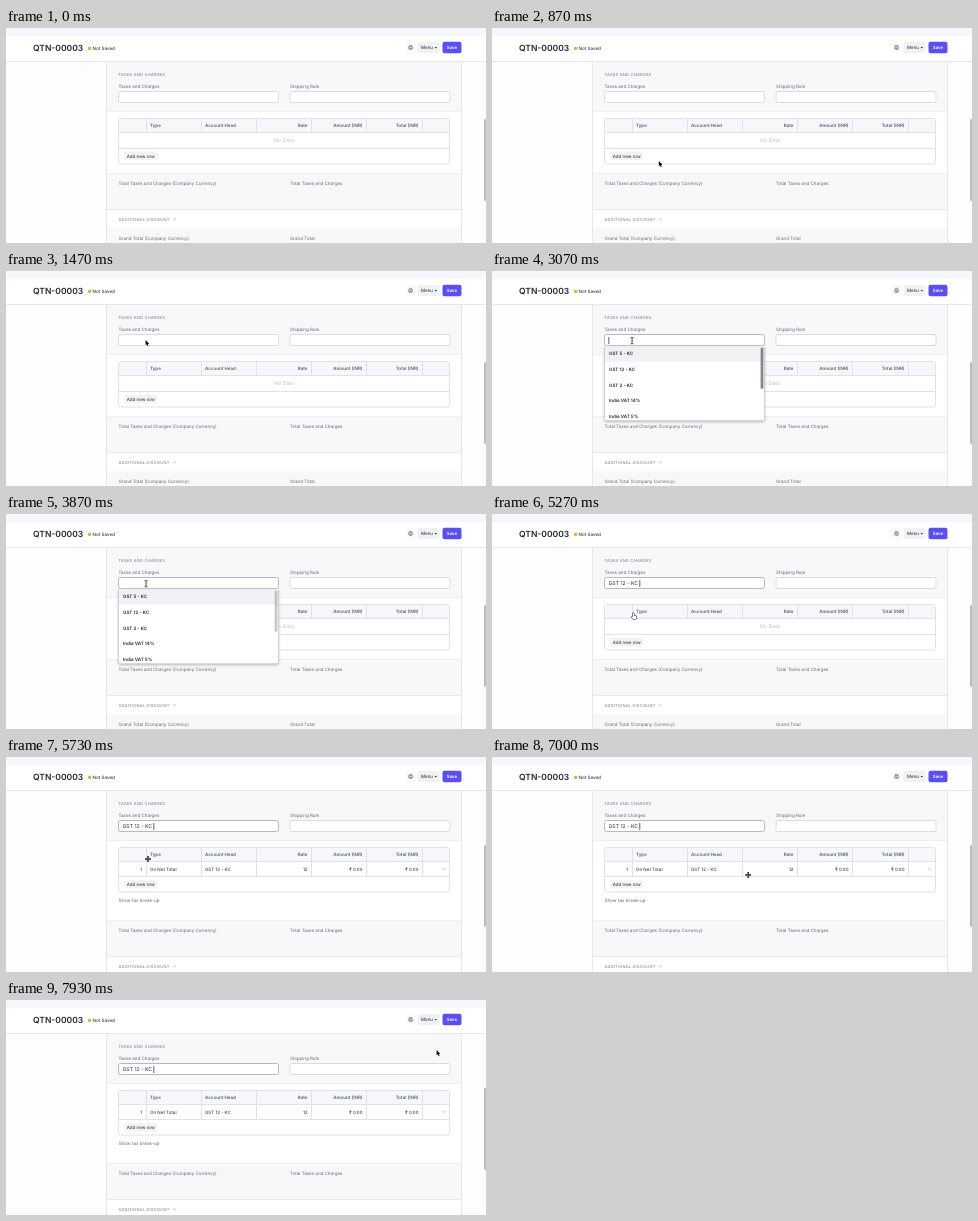
Write an HTML page with a canvas that moves like this. It is 480 px wide and 215 px high and loops after 8000 ms.

```html
<!DOCTYPE html>
<html lang="en">
<head>
<meta charset="utf-8">
<title>Quotation taxes</title>
<style>
html, body { margin: 0; width: 100%; height: 100%; overflow: hidden; background: #fdfcfe; }
canvas { display: block; }
</style>
</head>
<body>
<canvas id="stage" width="480" height="215"></canvas>
<script>
const ctx = document.getElementById('stage').getContext('2d');
const LOOP = 8000;
const OPEN = 3070, CLOSE = 5200, FILLED = 5730;
const INK = '#1f272e', LABEL = '#626a75', LINE = '#dfe2e8', TINT = '#f8f7fa';
const COLUMNS = [140, 195, 250, 305, 360, 416];
const OPTIONS = ['GST 5 - KC', 'GST 12 - KC', 'GST 2 - KC', 'India VAT 14%', 'India VAT 5%'];

const between = (t, a, b) => t >= a && t < b;
const clamp = v => Math.max(0, Math.min(1, v));

function rect(x, y, w, h, color) {
  ctx.fillStyle = color;
  ctx.fillRect(x, y, w, h);
}

function box(x, y, w, h, r, fill, stroke) {
  ctx.beginPath();
  ctx.roundRect(x, y, w, h, r);
  if (fill) { ctx.fillStyle = fill; ctx.fill(); }
  if (stroke) { ctx.strokeStyle = stroke; ctx.lineWidth = 1; ctx.stroke(); }
}

// y is the middle of the capital letters
function text(str, x, y, { size = 4.5, weight = 400, color = LABEL, align = 'left', spacing = 0 } = {}) {
  ctx.font = `${weight} ${size}px Inter, sans-serif`;
  ctx.letterSpacing = spacing + 'px';
  ctx.textAlign = align;
  ctx.fillStyle = color;
  ctx.fillText(str, x, y + size * 0.36);
}

function path(points, x, y, close) {
  ctx.beginPath();
  for (const [px, py] of points) ctx.lineTo(x + px, y + py);
  if (close) ctx.closePath();
}

function chevron(x, y, color) {
  path([[-1.4, -0.6], [0, 0.7], [1.4, -0.6]], x, y);
  ctx.strokeStyle = color;
  ctx.lineWidth = 0.6;
  ctx.stroke();
}

function heading(str, y) {
  text(str, 112.5, y, { size: 4, spacing: 0.24, color: '#6f7782' });
}

function header() {
  rect(0, 0, 480, 34, '#fff');
  rect(0, 0, 480, 8, '#f5f7fc');
  rect(0, 33, 480, 1, '#e5e7ed');
  text('QTN-00003', 27, 20.3, { size: 8.5, weight: 600, color: INK });
  box(82, 18.8, 3.2, 3.2, 1, '#e9ad3d');
  text('Not Saved', 86.5, 20.5, { size: 4.55, weight: 500, color: '#333b44' });

  box(400, 14, 9.5, 11, 2, '#fafafb');
  ctx.strokeStyle = '#69717c';
  ctx.lineWidth = 0.6;
  ctx.strokeRect(402.6, 18.8, 4, 2);
  ctx.strokeRect(403.4, 17.3, 2.4, 1.5);
  rect(403.4, 20.2, 2.4, 1.6, '#8a919a');

  box(411.5, 14, 22, 11, 2, '#f0f1f4');
  text('Menu', 415, 19.7, { color: INK });
  path([[-1.2, -0.6], [1.2, -0.6], [0, 0.8]], 429.8, 19.7, true);
  ctx.fillStyle = INK;
  ctx.fill();
  box(436.5, 13.7, 19, 11.5, 2, '#5b50ee');
  text('Save', 446, 19.6, { size: 4.4, weight: 600, color: '#fff', align: 'center' });
}

function table(filled) {
  const bottom = filled ? 135 : 136;
  const rowEnd = filled ? 119 : 120;
  box(112.5, 90.5, 331, bottom - 90.5, 2, '#fff', LINE);
  rect(113, 91, 330, 14, '#f5f7fa');
  rect(113, 104, 330, 1, LINE);
  rect(113, rowEnd, 330, 1, LINE);
  for (const x of COLUMNS) rect(x, 91, 1, (filled ? rowEnd : 104) - 91, LINE);

  const row = (y, cells, style) => cells.forEach((cell, i) => {
    const numeric = i > 1;
    text(cell, numeric ? COLUMNS[i + 1] - 3.5 : COLUMNS[i] + 4, y,
      { ...style, align: numeric ? 'right' : 'left' });
  });
  row(97.4, ['Type', 'Account Head', 'Rate', 'Amount (INR)', 'Total (INR)'],
    { weight: 600, color: '#59626d' });

  if (filled) {
    text('1', 136, 112, { color: INK, align: 'right' });
    row(112, ['On Net Total', 'GST 12 - KC', '12', '₹ 0.00', '₹ 0.00'], { color: INK });
    chevron(437.5, 112, '#8a929c');
  } else {
    text('No Data', 278, 112.5, { size: 5.2, color: '#bdc3ca', align: 'center' });
  }
  const y = filled ? 127.4 : 128;
  box(118, y - 4.2, 33, 8.4, 1.5, '#f2f3f5');
  text('Add new row', 120.7, y, { color: INK });
}

function form(t) {
  const filled = t >= FILLED;
  const shift = filled ? 18 : 0;
  rect(0, 0, 480, 215, '#fdfcfe');
  rect(101, 34, 354, 181, '#fff');
  rect(101, 34, 354, 49, TINT);
  rect(101, 83, 354, 1, '#eeeff3');
  rect(101, 146 + shift, 354, 35, TINT);
  rect(101, 145 + shift, 354, 1, '#eeeff3');
  rect(101, 181 + shift, 354, 1, '#e7e8ed');
  if (!filled) rect(101, 200, 354, 15, TINT);
  rect(100, 34, 1, 181, '#e5e7ec');
  rect(455, 34, 1, 181, '#e5e7ec');

  heading('TAXES AND CHARGES', 46.6);
  text('Taxes and Charges', 112.5, 58.3);
  text('Shipping Rule', 284, 58.3);
  const focused = t >= 2600;
  box(112.5, 63.5, 160, 11, 2, '#fff', focused ? '#b3b8c2' : '#d9dce3');
  box(284, 63.5, 160, 11, 2, '#fff', '#d9dce3');

  table(filled);
  if (filled) text('Show tax break-up', 112.5, 143.3, { size: 4.6 });
  text('Total Taxes and Charges (Company Currency)', 112.5, 155.7 + shift);
  text('Total Taxes and Charges', 284, 155.7 + shift);
  heading('ADDITIONAL DISCOUNT', 191.2 + shift);
  chevron(168.5, 191.2 + shift, '#8a929c');
  text('Grand Total (Company Currency)', 112.5, 210.5 + shift);
  text('Grand Total', 284, 210.5 + shift);
  box(478, filled ? 88 : 91, 2, 82, 1, '#bcbcc0');
}

function field(t) {
  if (t >= CLOSE) text('GST 12 - KC', 116.5, 69.2, { size: 5.2, color: INK });
  const caretOn = between(t, 2600, 3600) || between(t, 4070, 4450) || t >= 5000;
  if (caretOn) rect(t >= CLOSE ? 147.5 : 116.5, 66, 0.7, 7, '#222');
}

function dropdown(t) {
  if (!between(t, OPEN, CLOSE)) return;
  ctx.save();
  ctx.shadowColor = 'rgba(0,0,0,0.3)';
  ctx.shadowBlur = 3;
  ctx.shadowOffsetY = 1;
  box(112.5, 75, 160, 74.7, 2, '#fff');
  ctx.restore();
  box(112.5, 75, 160, 74.7, 2, null, '#cfd3d9');

  ctx.save();
  ctx.beginPath();
  ctx.rect(113, 75, 159, 74.3);
  ctx.clip();
  const active = t < 4600 ? 0 : 1;
  rect(113, 75.3 + active * 15.7, 159, 15.3, '#eff1f4');
  OPTIONS.forEach((name, i) =>
    text(name, 117, 82.6 + i * 15.7, { size: 4.55, weight: 600, color: INK }));
  ctx.globalAlpha = 1 - clamp((t - 3600) / 500);
  box(268.6, 76.5, 2.8, 41.5, 1.4, '#85878a');
  ctx.restore();
}

// Each move: start, end, from, to, easing
const easeOut = p => 1 - (1 - p) ** 2.2;
const easeIn = p => p ** 1.25;
const linear = p => p;
const MOVES = [
  [600, 1430, [205, 222], [140, 69.5], easeOut],
  [4370, 4640, [140, 69.5], [142, 102], p => clamp(p * 2.1) * 0.8 + clamp(p * 2 - 1) * 0.2],
  [6170, 7000, [142, 102], [256, 118], easeIn],
  [7000, 7930, [256, 118], [431, 50.5], linear]
];

function pointer(t) {
  let [x, y] = MOVES[0][2];
  for (const [start, end, from, to, ease] of MOVES) {
    if (t < start) break;
    const p = ease(clamp((t - start) / (end - start)));
    x = from[0] + (to[0] - from[0]) * p;
    y = from[1] + (to[1] - from[1]) * p;
  }
  return [x, y];
}

function outlined(fill, edge) {
  ctx.lineJoin = 'round';
  ctx.lineWidth = 1;
  ctx.strokeStyle = edge;
  ctx.stroke();
  ctx.fillStyle = fill;
  ctx.fill();
}

const CURSORS = {
  arrow(x, y) {
    path([[0, -0.5], [0, 4.8], [1.2, 3.8], [2.1, 5.8], [3, 5.4], [2.1, 3.5], [3.7, 3.4]], x - 0.4, y, true);
    outlined('#000', '#fff');
  },
  beam(x, y) {
    rect(x - 0.4, y - 3, 0.9, 6.4, '#333');
    rect(x - 1.6, y - 3.2, 3.3, 0.8, '#555');
    rect(x - 1.6, y + 2.9, 3.3, 0.8, '#555');
  },
  hand(x, y) {
    path([[-1.2, -3], [-0.2, -3], [0, -0.6], [2.4, 0], [2.3, 2], [1.7, 3.2], [-1, 3.2],
      [-2.5, 1], [-2.1, 0.3], [-1.2, 1]], x, y, true);
    outlined('#fff', '#111');
  },
  move(x, y) {
    path([[-2.8, 0], [2.8, 0]], x, y);
    ctx.moveTo(x, y - 2.8);
    ctx.lineTo(x, y + 2.8);
    ctx.strokeStyle = '#fff';
    ctx.lineWidth = 2;
    ctx.stroke();
    ctx.strokeStyle = '#111';
    ctx.lineWidth = 1;
    ctx.stroke();
    for (const [dx, dy] of [[1, 0], [-1, 0], [0, 1], [0, -1]]) {
      path([[dx * 3, dy * 3], [dx * 1.7 + dy * 1.3, dy * 1.7 + dx * 1.3],
        [dx * 1.7 - dy * 1.3, dy * 1.7 - dx * 1.3]], x, y, true);
      ctx.fillStyle = '#111';
      ctx.fill();
    }
  }
};

function cursor(t) {
  const [x, y] = pointer(t);
  let kind = 'arrow';
  if (between(t, 2470, CLOSE + 270)) kind = y < 76 ? 'beam' : 'hand';
  else if (t >= CLOSE + 270 && y > 90) kind = 'move';
  CURSORS[kind](x, y);
}

function draw(t) {
  ctx.textRendering = 'geometricPrecision';
  form(t);
  header();
  field(t);
  dropdown(t);
  cursor(t);
}

const began = performance.now();
function frame() {
  draw((performance.now() - began) % LOOP);
  requestAnimationFrame(frame);
}
frame();
</script>
</body>
</html>
```
